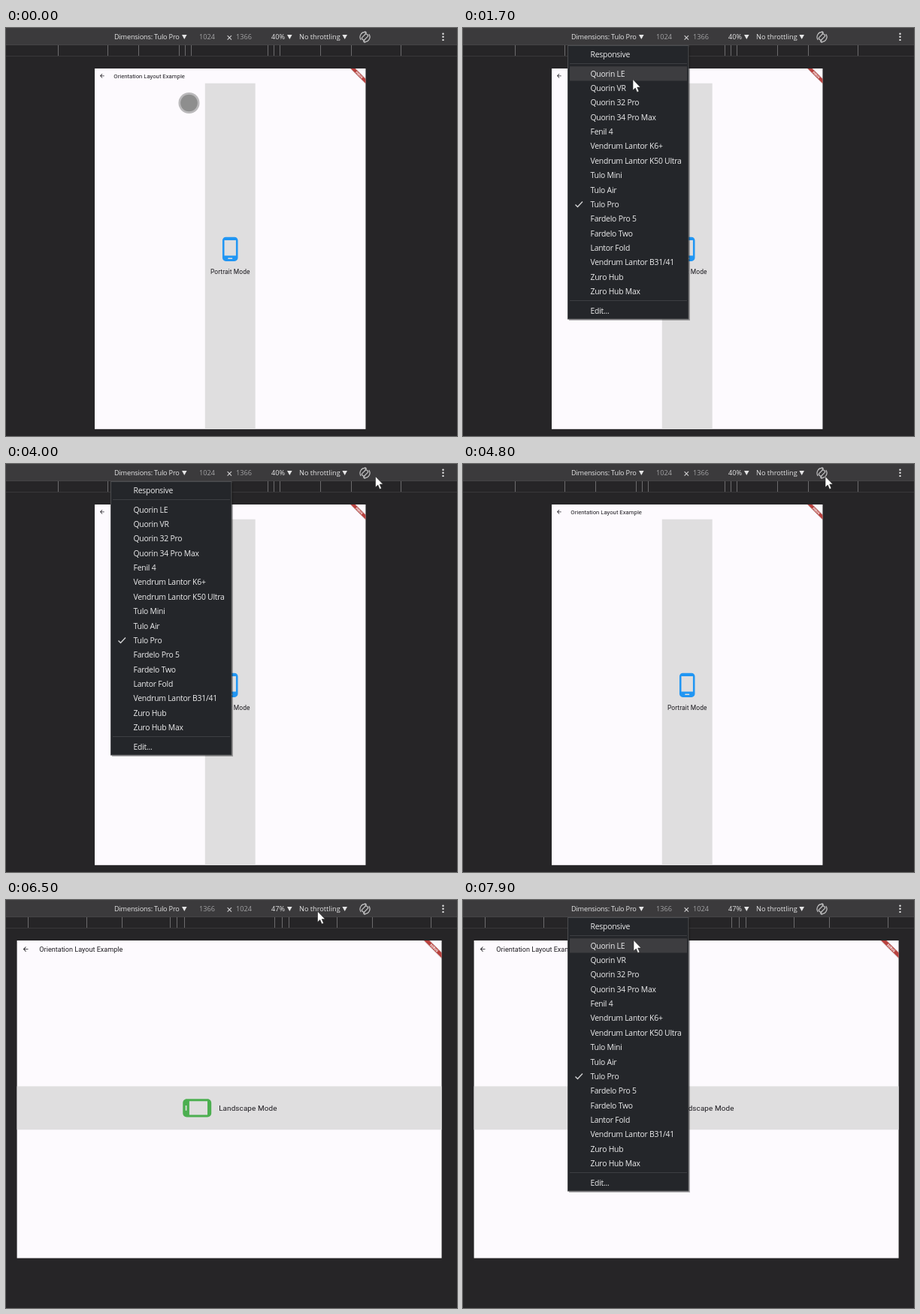
An HTML page for the animation above (8000 ms loop, 600 px wide and 544 px high).

```html
<!DOCTYPE html>
<html lang="en">
<head>
<meta charset="utf-8">
<title>Orientation layout</title>
<style>
  html, body { margin: 0; width: 100%; height: 100%; overflow: hidden; background: #262527; }
  svg { display: block; width: 100%; height: 100%; }
  .ui { font: 9.2px "Open Sans", "Noto Sans", sans-serif; fill: #e4e4e5; }
  .dim { fill: #a2a2a4; }
  .menu { font: 10.4px "Open Sans", "Noto Sans", sans-serif; letter-spacing: -.23px; fill: #ededee; }
  .app { font-family: Roboto, sans-serif; fill: #1d1b20; }
  .mode { font-size: 24px; letter-spacing: .25px; }
</style>
</head>
<body>
<svg viewBox="0 0 600 544">
  <defs>
    <path id="phone" d="M16 1H8C6.34 1 5 2.34 5 4v16c0 1.66 1.34 3 3 3h8c1.66 0 3-1.34 3-3V4c0-1.66-1.34-3-3-3zm-2 20h-4v-1h4v1zm3.25-3H6.75V4h10.5v14z"/>
    <clipPath id="corner"><rect x="-80" width="80" height="80"/></clipPath>
  </defs>
  <rect width="600" height="544" fill="#262527"/>
  <rect width="600" height="23" fill="#3b3a3c"/>
  <path d="M0 22.5H600" stroke="#454446"/>
  <path d="M0 37.5H600" stroke="#39383a"/>
  <path id="ticks" stroke="#6c6b6d" fill="none"/>

  <g class="ui">
    <text x="144" y="15.4" letter-spacing="-.2">Dimensions: Tulo Pro</text>
    <text id="wide" class="dim" x="257" y="15.4"></text>
    <path d="M294.6 10.2l5.4 5.4m0-5.4l-5.4 5.4" stroke="#d0d0d1" stroke-width="1.1"/>
    <text id="high" class="dim" x="306" y="15.4"></text>
    <text id="zoom" x="353" y="15.4"></text>
    <text x="390" y="15.4">No throttling</text>
    <path d="M234 9h6.6l-3.3 6zM374 9h6.6l-3.3 6zM447.4 9h6.6l-3.3 6z"/>
    <circle cx="581.5" cy="7.7" r="1.2"/><circle cx="581.5" cy="11.8" r="1.2"/><circle cx="581.5" cy="15.9" r="1.2"/>
  </g>
  <g id="rotate" transform="translate(477.5 12)" fill="none" stroke-width="1.2">
    <rect x="-2.2" y="-4.4" width="4.4" height="8.8" rx="1" transform="rotate(45)"/>
    <path d="M-5.2 3.9A6.5 6.5 0 0 1 1.5-6.3M5.2-3.9A6.5 6.5 0 0 1-1.5 6.3M-.4-7.6L1.8-6.2.2-4.4M.4 7.6L-1.8 6.2-.2 4.4"/>
  </g>

  <g id="app" class="app">
    <rect id="page" fill="#fdfafe"/>
    <g id="content">
      <path transform="translate(16 16)" d="M20 11H7.83l5.59-5.59L12 4l-8 8 8 8 1.41-1.41L7.83 13H20v-2z"/>
      <text x="72" y="35.8" font-size="22">Orientation Layout Example</text>
      <g id="portrait">
        <rect x="417" y="56" width="190" height="1310" fill="#dfdedf"/>
        <use href="#phone" fill="#2196f3" transform="translate(462 634) scale(4.1667)"/>
        <text class="mode" x="512" y="779.5" text-anchor="middle">Portrait Mode</text>
      </g>
      <g id="landscape">
        <rect y="470" width="1366" height="140" fill="#dfdedf"/>
        <use href="#phone" fill="#4caf50" transform="translate(629.4 490) rotate(90) scale(4.1667)"/>
        <text class="mode" x="649.4" y="548.5">Landscape Mode</text>
      </g>
      <g id="banner"><g clip-path="url(#corner)"><g transform="rotate(45)">
        <rect x="-44" y="26" width="88" height="16" fill="#000" opacity=".14"/>
        <rect x="-44" y="28" width="88" height="12" fill="#b9423f"/>
        <text y="37.6" font-size="10.2" font-weight="900" fill="#fff" text-anchor="middle">DEBUG</text>
      </g></g></g>
    </g>
  </g>

  <g id="menu" class="menu">
    <rect x="141" y="25" width="161" height="365" fill="#000" opacity=".3"/>
    <rect x="139.5" y="23.5" width="160.5" height="364.5" fill="#24262a" stroke="#4b4c4f"/>
    <path d="M142 47.5H298M142 363.5H298" stroke="#3d3e42"/>
    <rect id="hover" x="142" width="156" height="19.2" fill="#3d3d40"/>
    <path d="M149.5 235.5l3 3 6.5-7" fill="none" stroke="#d5d5d6" stroke-width="1.3"/>
    <g id="items"></g>
  </g>

  <g id="touch">
    <circle r="14" fill="#777" opacity=".5"/>
    <circle r="11.3" fill="#868686" opacity=".85"/>
  </g>
  <path id="arrow" d="M0 0V14.5L3.3 11.5 5.6 17 8 16 5.7 10.6H10Z" fill="#fff" stroke="#222" stroke-width=".6"/>
</svg>
<script>
const $ = id => document.getElementById(id);
const set = (el, attrs) => { for (const k in attrs) el.setAttribute(k, attrs[k]); };
const show = (id, on) => { $(id).style.display = on ? '' : 'none'; };

const LOOP = 8000, STEP = 100;
const FIRST_ROW = 60.8, PITCH = 19.37;
const devices = ['Quorin LE', 'Quorin VR', 'Quorin 32 Pro', 'Quorin 34 Pro Max', 'Fenil 4',
  'Vendrum Lantor K6+', 'Vendrum Lantor K50 Ultra', 'Tulo Mini', 'Tulo Air', 'Tulo Pro',
  'Fardelo Pro 5', 'Fardelo Two', 'Lantor Fold', 'Vendrum Lantor B31/41', 'Zuro Hub', 'Zuro Hub Max'];
const breakpoints = [320, 375, 425, 768, 1024, 1440];

// Pointer path: time, x, y
const path = [
  [0, 243.5, 100], [300, 290, 62], [500, 342, 20], [800, 232, 8], [1400, 232, 8],
  [1700, 226, 68.5], [2100, 222, 180], [2300, 222, 180], [3100, 496, 20], [3300, 496, 20],
  [4000, 491.5, 16.5], [4100, 491.5, 16.5], [4500, 482, 10], [4800, 482, 16.5], [5900, 482, 16.5],
  [6500, 414.5, 15], [6800, 322, 20], [7100, 222, 14], [7600, 222, 14], [7900, 227, 53.5], [8000, 227, 53.5]
];

function addItem(label, y) {
  const el = document.createElementNS('http://www.w3.org/2000/svg', 'text');
  set(el, { x: 169.5, y: y + 3.8 });
  el.textContent = label;
  $('items').append(el);
}
addItem('Responsive', 35.5);
devices.forEach((name, i) => addItem(name, FIRST_ROW + i * PITCH));
addItem('Edit...', 377);

function pointer(t) {
  const i = path.findIndex(p => p[0] > t);
  const [t0, x0, y0] = path[i - 1], [t1, x1, y1] = path[i];
  const k = (t - t0) / (t1 - t0);
  return [x0 + (x1 - x0) * k, y0 + (y1 - y0) * k];
}

function layout(wide) {
  const [w, h] = wide ? [1366, 1024] : [1024, 1366];
  set($('app'), { transform: wide ? 'translate(14.6 54) scale(.4136)' : 'translate(118 54) scale(.352)' });
  set($('page'), { width: w, height: h });
  set($('banner'), { transform: `translate(${w} 0)` });
  show('portrait', !wide);
  show('landscape', wide);
  $('wide').textContent = w;
  $('high').textContent = h;
  $('zoom').textContent = wide ? '47%' : '40%';
  const scale = wide ? .372 : .316;
  const tick = x => `M${Math.round(x) + .5} 23V37`;
  const d = breakpoints.map(b => tick(297 - b * scale / 2) + tick(297 + b * scale / 2)).join('');
  set($('ticks'), { d });
}

function render(time) {
  const t = Math.floor(time % LOOP / STEP) * STEP;
  const [x, y] = pointer(t);
  const menuOpen = t >= 1200 && t < 4300 || t >= 7400;
  const row = Math.round((y - FIRST_ROW) / PITCH);
  const touching = t < 800 && y > 54;

  layout(t >= 5000);
  show('content', t !== 5000);
  set($('rotate'), { stroke: t >= 5000 && t < 6000 ? '#f2f2f2' : '#c4c4c5' });

  show('menu', menuOpen);
  show('hover', x < 300 && y > 50);
  set($('hover'), { y: FIRST_ROW + row * PITCH - 9.6 });

  show('touch', touching);
  show('arrow', !touching);
  set($(touching ? 'touch' : 'arrow'), { transform: `translate(${x} ${y})` });
}

function frame() {
  render(performance.now());
  requestAnimationFrame(frame);
}
frame();
</script>
</body>
</html>
```
